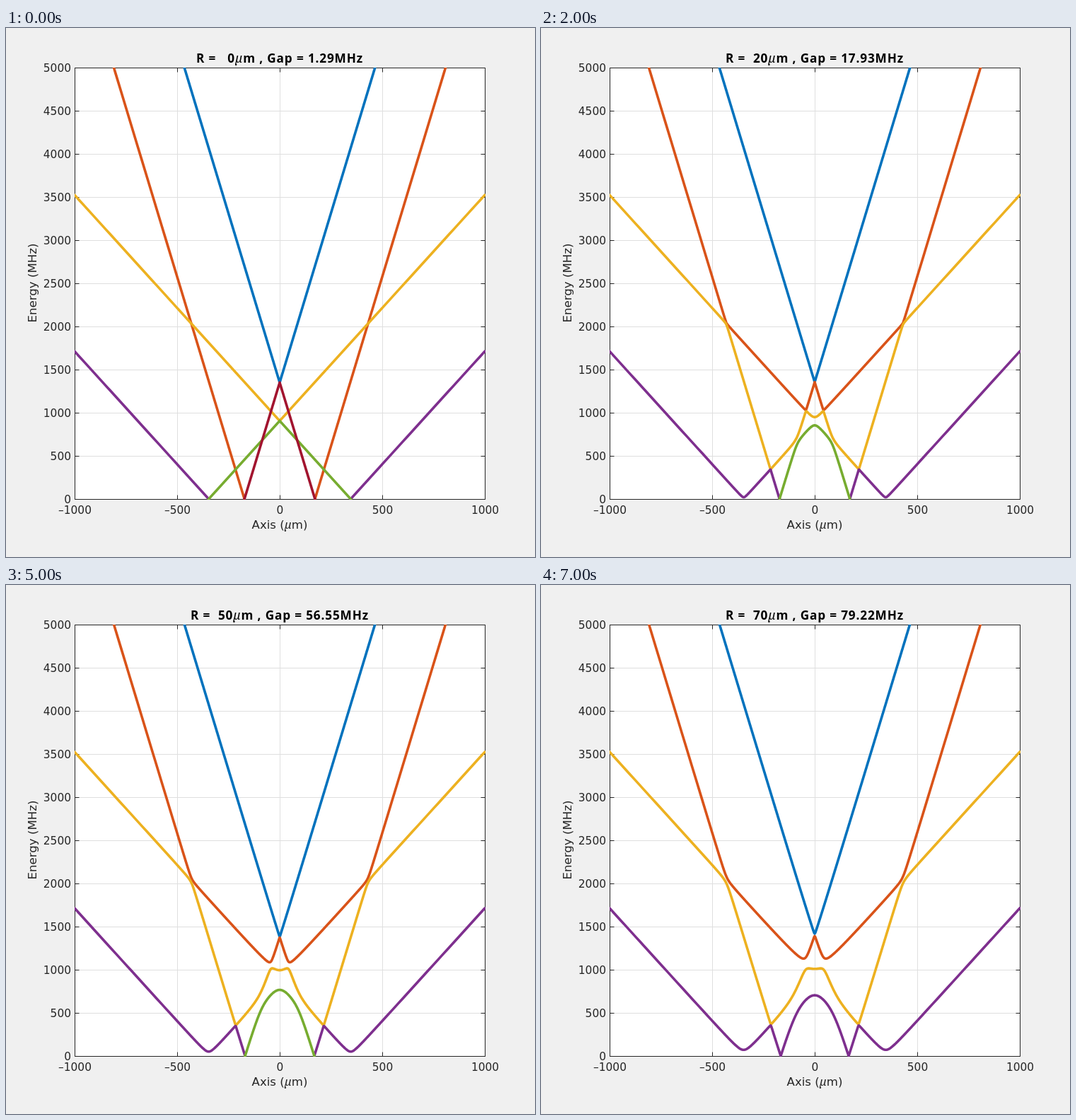
Write an HTML page that moves like this. It is 748 px wide and 748 px high and loops after 8 s.

```html
<!DOCTYPE html>
<html lang="en">
<head>
<meta charset="utf-8">
<style>
  html, body { margin: 0; height: 100%; overflow: hidden; background: #f0f0f0; }
  svg { display: block; width: 748px; height: 748px; }
  text { font: 15.4px "DejaVu Sans", sans-serif; fill: #262626; white-space: pre; }
  .label { font-size: 16.6px; text-anchor: middle; }
  .title { font: bold 17.2px "Open Sans", sans-serif; letter-spacing: .85px; fill: #000; }
  .mu { font-family: "Noto Serif", serif; font-style: italic; font-weight: normal; }
  .grid { stroke: #dfdfdf; }
  .axis { stroke: #262626; fill: none; }
  #curves path { fill: none; stroke-width: 3.6; stroke-linejoin: round; stroke-linecap: round; }
</style>
</head>
<body>
<svg viewBox="0 0 748 748">
  <clipPath id="plot"><rect x="97" y="56" width="581" height="611"/></clipPath>
  <rect x="97" y="56" width="581" height="611" fill="#fff"/>
  <g id="axes"></g>
  <g id="curves" clip-path="url(#plot)"></g>
  <text class="label title" x="387" y="48.5">R = <tspan id="radius"></tspan><tspan class="mu">μ</tspan>m , Gap = <tspan id="gap"></tspan>MHz</text>
  <text class="label" x="387" y="708">Axis (<tspan class="mu">μ</tspan>m)</text>
  <text class="label" transform="translate(43 360.5) rotate(-90)">Energy (MHz)</text>
</svg>
<script>
const BLUE = '#0072bd', ORANGE = '#d95319', YELLOW = '#edb120', PURPLE = '#7e2f8e',
      GREEN = '#77ac30', CYAN = '#5595c4', RED = '#a2142f';
const STEP_MS = 1000;
const GAPS = [1.29, 11.35, 17.93, 33.92, 45.23, 56.55, 67.87, 79.22];

// Spin 3/2 doublet: half splitting, electric and magnetic couplings (MHz, MHz per μm)
const SPLIT = 833.7, ELECTRIC = 708, MAGNETIC = 5.2346;

const $ = id => document.getElementById(id);
const px = x => 387 + x * 0.29;
const py = e => 666 - e * 0.122;

function drawAxes() {
  const crisp = v => Math.round(v) + 0.5;
  let grid = '', ticks = 'M97.5 56.5H677.5V666.5H97.5Z', labels = '';
  for (let x = -1000; x <= 1000; x += 500) {
    const c = crisp(px(x));
    grid += `M${c} 56V667`;
    ticks += `M${c} 56.5v6M${c} 666.5v-6`;
    labels += `<text x="${c}" y="687" text-anchor="middle">${String(x).replace('-', '–')}</text>`;
  }
  for (let e = 0; e <= 5000; e += 500) {
    const c = crisp(py(e));
    grid += `M97 ${c}H678`;
    ticks += `M97.5 ${c}h6M677.5 ${c}h-6`;
    labels += `<text x="92" y="${c + 5.5}" text-anchor="end">${e}</text>`;
  }
  $('axes').innerHTML = `<path class="grid" d="${grid}"/><path class="axis" d="${ticks}"/>${labels}`;
}

// Jacobi rotations on a real symmetric matrix
function eigenvalues(a) {
  const n = a.length;
  for (let sweep = 0; sweep < 8; sweep++)
    for (let p = 0; p < n; p++)
      for (let q = p + 1; q < n; q++) {
        if (Math.abs(a[p][q]) < 1e-6) continue;
        const t = Math.atan2(2 * a[p][q], a[q][q] - a[p][p]) / 2;
        const c = Math.cos(t), s = Math.sin(t);
        for (const row of a)
          [row[p], row[q]] = [c * row[p] - s * row[q], s * row[p] + c * row[q]];
        for (let k = 0; k < n; k++) {
          const u = a[p][k], v = a[q][k];
          a[p][k] = c * u - s * v;
          a[q][k] = s * u + c * v;
        }
      }
  return a.map((row, i) => row[i]).sort((u, v) => v - u);
}

// The four upper levels at axial position x and radius r
function levels(x, r) {
  const h = Array.from({ length: 8 }, () => new Array(8).fill(0));
  for (let k = 0; k < 4; k++) {
    const m = 1.5 - k, i = 2 * k;
    h[i][i] = SPLIT + MAGNETIC * x * m;
    h[i + 1][i + 1] = -SPLIT + MAGNETIC * x * m;
    h[i][i + 1] = h[i + 1][i] = ELECTRIC * m;
    if (k === 3) continue;
    const flip = MAGNETIC * r / 2 * (k === 1 ? 1 : Math.sqrt(3) / 2);
    for (const j of [i, i + 1]) h[j][j + 2] = h[j + 2][j] = flip;
  }
  return eigenvalues(h).slice(0, 4);
}

const xs = [];
for (let x = 0; x <= 1000; x += x < 500 ? 1 : 25) xs.push(x);

// Mirrored curve of energy(x, index) for from <= |x| <= to
function curve(color, energy, from = 0, to = 1000) {
  let d = '';
  for (const side of [-1, 1]) {
    const points = [];
    xs.forEach((x, i) => {
      if (x >= from && x <= to)
        points.push(px(side * x).toFixed(2) + ' ' + py(energy(x, i)).toFixed(2));
    });
    d += 'M' + points.join('L');
  }
  return `<path stroke="${color}" d="${d}"/>`;
}

function crossingCurves() {
  const line = m => [Math.hypot(SPLIT, ELECTRIC * m), MAGNETIC * m];
  const [steepTop, steep] = line(1.5), [flatTop, flat] = line(0.5);
  return curve(BLUE, x => steepTop + steep * x)
    + curve(ORANGE, x => steep * x - steepTop, steepTop / steep)
    + curve(YELLOW, x => flatTop + flat * x)
    + curve(PURPLE, x => flat * x - flatTop, flatTop / flat)
    + curve(GREEN, x => flatTop - flat * x, 0, flatTop / flat + 1)
    + curve(RED, x => steepTop - steep * x, 0, steepTop / steep + 1);
}

function mixedCurves(r) {
  const table = xs.map(x => levels(x, r));
  const level = n => (x, i) => Math.abs(table[i][n]);
  let zero = 100;
  for (let x = 100; x < 250; x++) if (table[x][3] < table[zero][3]) zero = x;
  const upper = curve(BLUE, level(0)) + curve(ORANGE, level(1));
  if (r === 10) {
    const swap = 215;
    return upper
      + curve(YELLOW, level(2), swap) + curve(YELLOW, level(3), zero, swap)
      + curve(PURPLE, level(3), swap) + curve(PURPLE, level(2), 0, swap)
      + curve(CYAN, level(3), 0, zero);
  }
  return upper + curve(YELLOW, level(2)) + curve(PURPLE, level(3), zero)
    + curve(r < 60 ? GREEN : PURPLE, level(3), 0, zero);
}

drawAxes();
const plots = GAPS.map((_, i) => i ? mixedCurves(10 * i) : crossingCurves());

let shown = -1;
function render(now) {
  const step = Math.floor(now / STEP_MS) % GAPS.length;
  if (step !== shown) {
    shown = step;
    $('curves').innerHTML = plots[step];
    $('radius').textContent = String(10 * step).padStart(3);
    $('gap').textContent = GAPS[step].toFixed(2);
  }
}

const start = performance.now();
function tick() {
  render(performance.now() - start);
  requestAnimationFrame(tick);
}
tick();
</script>
</body>
</html>
```
